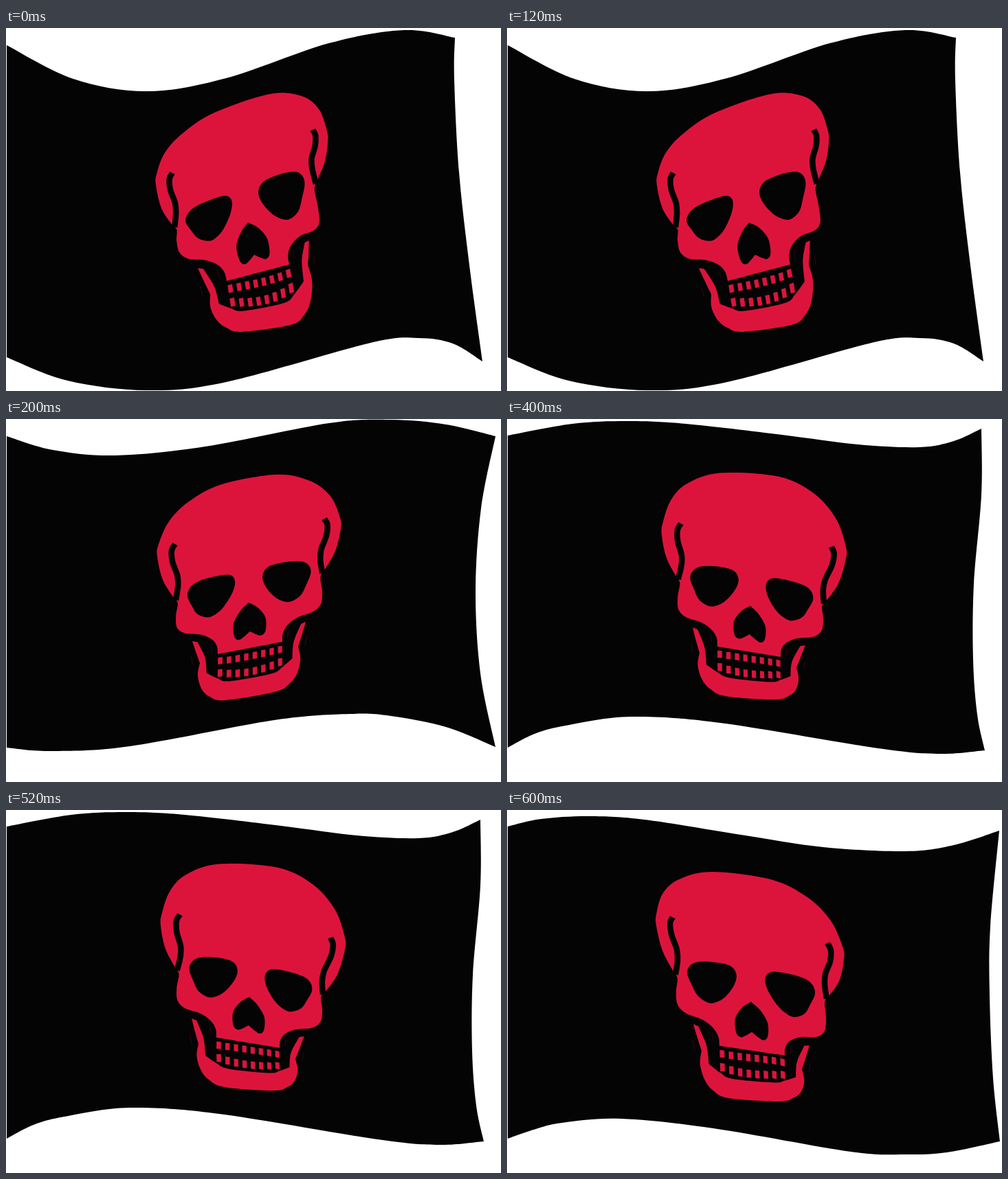
Write an HTML page that moves like this. It is 720x528 px and loops after 0.8 s.

```html
<!DOCTYPE html>
<html lang="en">
<head>
<meta charset="utf-8">
<title>Waving skull flag</title>
<style>
html, body { margin: 0; width: 100%; height: 100%; overflow: hidden; background: #fff; }
svg { display: block; width: 720px; height: 528px; }
.cloth, .hole { fill: #040404; }
.bone { fill: #dc143c; }
.groove { fill: none; stroke: #040404; stroke-width: 8.5; }
.scratch { fill: none; stroke: #3a0510; stroke-width: 1; }
</style>
</head>
<body>
<svg id="stage" viewBox="0 0 720 528"></svg>
<script>
const HOLD = 200;
const stage = document.getElementById('stage');

// Points are [x, y, corner]; "!" marks a corner, all others are passed smoothly.
const parse = s => s.trim().split(/\s+/).map(p => [...p.split(',').map(parseFloat), p.endsWith('!')]);
const flip = ([x, y, corner]) => [-x, y, corner];
const mirrored = half => [...half, ...half.map(flip).reverse()];
const fmt = p => p[0].toFixed(2) + ' ' + p[1].toFixed(2);

// The skull is symmetric about x = 0, so only one half is given.
const face = mirrored(parse(`40,88 88,105 117,130 132,162 134,180 126,214 110,241! 104,250
  106,268 104,286 92,296 70,301 55,310 48,321 47,333!`));
const jaw = mirrored(parse(`36,403 58,394 69,381 74,361 71,343! 77,325 82,309! 75,311! 66,330
  63,342 62,359! 47,369 30,376`));
const nose = mirrored(parse('0,267! 12,276 22,290 24,302 22,314 16,318 9,315 0,309!'));
const eye = parse('90,241 86,229 74,222 50,219 28,221 20,232 24,248 37,266 50,275 61,277 75,270 83,257');
const groove = parse('108,163 113,172 112,189 105,209 104,225 107,245');
const scratches = [parse('83,331 81,344'), parse('56,317 55,328')];

// Key points: crown, temple, groove top, lobe tip, cheek, mouth, jaw hinge, chin side.
const keys = parse('88,105 134,177 109,163 110,241 106,275 47,333 71,343 60,393');
const rest = [...keys.map(flip), ...keys, [0, 267]];

// Gaussian elimination with pivoting; each row ends in two right-hand values.
function solve(rows) {
  const n = rows.length;
  for (let c = 0; c < n; c++) {
    let best = c;
    for (let r = c + 1; r < n; r++) {
      if (Math.abs(rows[r][c]) > Math.abs(rows[best][c])) best = r;
    }
    [rows[c], rows[best]] = [rows[best], rows[c]];
    for (let r = 0; r < n; r++) {
      if (r === c) continue;
      const k = rows[r][c] / rows[c][c];
      for (let j = c; j < n + 2; j++) rows[r][j] -= k * rows[c][j];
    }
  }
  return rows.map((row, i) => [row[n] / row[i], row[n + 1] / row[i]]);
}

// Thin-plate spline that bends the plane so `from` lands on `to`.
function makeWarp(from, to) {
  const scale = 100;
  const src = from.map(([x, y]) => [x / scale, y / scale]);
  const basis = (x, y) => [
    ...src.map(([a, b]) => {
      const d = (x - a) ** 2 + (y - b) ** 2;
      return d ? d * Math.log(d) : 0;
    }), 1, x, y
  ];
  const rows = src.map(([x, y], i) => [...basis(x, y), to[i][0], to[i][1]]);
  for (let k = 0; k < 3; k++) {
    rows.push([...src.map(([x, y]) => [1, x, y][k]), 0, 0, 0, 0, 0]);
  }
  const weights = solve(rows);
  return ([x, y, corner]) => {
    const b = basis(x / scale, y / scale);
    const sum = k => b.reduce((s, v, i) => s + v * weights[i][k], 0);
    return [sum(0), sum(1), corner];
  };
}

// Catmull-Rom curve that breaks its tangent at corners.
function curve(pts, closed = true) {
  const n = pts.length;
  const at = i => closed ? pts[(i + n) % n] : pts[Math.max(0, Math.min(n - 1, i))];
  let d = 'M' + fmt(pts[0]);
  for (let i = 0; i < (closed ? n : n - 1); i++) {
    const b = at(i), c = at(i + 1);
    const a = b[2] ? b : at(i - 1);
    const e = c[2] ? c : at(i + 2);
    const out = [0, 1].map(k => b[k] + (c[k] - a[k]) / 6);
    const into = [0, 1].map(k => c[k] - (e[k] - b[k]) / 6);
    d += `C${fmt(out)} ${fmt(into)} ${fmt(c)}`;
  }
  return closed ? d + 'Z' : d;
}

// Eight teeth whose row rises by `lift` towards both ends.
function teeth(warp, y, lift, height) {
  let d = '';
  for (let i = 0; i < 8; i++) {
    const u = (i - 3.5) / 3.5;
    const box = [[-1, -1], [1, -1], [1, 1], [-1, 1]].map(([a, b]) =>
      fmt(warp([u * 43.5 + a * 3.2, y - lift * u * u + b * height / 2])));
    d += 'M' + box.join('L') + 'Z';
  }
  return d;
}

function add(parent, tag, attrs) {
  const el = document.createElementNS('http://www.w3.org/2000/svg', tag);
  for (const key in attrs) el.setAttribute(key, attrs[key]);
  return parent.appendChild(el);
}

function pose(cloth, marks) {
  const g = add(stage, 'g', { display: 'none' });
  const warp = makeWarp(rest, parse(marks));
  const draw = (kind, d) => add(g, 'path', { class: kind, d });
  const shape = (kind, pts, closed) => draw(kind, curve(pts.map(warp), closed));
  const pair = (kind, pts, closed) => {
    shape(kind, pts, closed);
    shape(kind, pts.map(flip), closed);
  };
  draw('cloth', curve(parse(cloth)));
  shape('bone', face);
  shape('bone', jaw);
  shape('hole', nose);
  pair('hole', eye);
  pair('groove', groove, false);
  scratches.forEach(s => pair('scratch', s, false));
  draw('bone', teeth(warp, 345, 1.5, 10));
  draw('bone', teeth(warp, 367.5, 6, 11));
  return g;
}

// Each pose: cloth outline, then where the key points go (left, right, nose top).
const poses = [
  pose(`1,25! 98,74 205,92 320,73 470,22 580,3 653,14! 652,75 659,210 674,345 693,485!
    650,459 600,451 530,458 320,515 205,527 90,513 1,479!`,
    `256,154 218,226 241,211 242,287 249,316 321,368 297,387 318,435
    430,99 468,163 447,148 453,221 455,270 412,344 439,345 436,415 352,283`),
  pose(`1,25! 68,45 160,53 290,40 470,6 560,1 640,8 712,25! 691,130 683,250 690,370 712,477!
    640,448 560,432 500,429 390,438 180,476 65,483 1,478!`,
    `266,120 220,197 245,182 244,260 247,293 308,342 282,355 294,403
    442,90 487,157 464,145 463,220 460,257 402,324 425,331 415,383 353,267`),
  pose(`1,24! 95,7 175,3 260,7 400,23 510,37 600,41 650,32 690,14! 690,110 679,240 678,350
    684,430 695,482! 630,487 540,479 310,442 180,433 85,446 40,458 1,478!`,
    `262,94 225,165 252,152 246,229 248,265 306,331 280,340 294,392
    446,108 493,201 473,186 464,265 460,297 398,346 421,362 412,402 354,272`),
  pose(`1,24! 50,13 120,9 200,14 340,36 460,54 580,60 650,51 716,30! 703,170 702,270 707,390
    717,482! 640,498 580,501 500,497 300,463 165,449 80,455 42,464 1,478!`,
    `250,101 217,166 240,156 242,235 246,271 309,343 283,350 298,407
    437,127 490,214 467,194 468,271 464,309 404,357 429,377 419,418 355,279`)
];

function update(time) {
  const now = Math.floor(time / HOLD) % poses.length;
  poses.forEach((g, i) => g.setAttribute('display', i === now ? 'inline' : 'none'));
}

function tick(time) {
  update(time);
  requestAnimationFrame(tick);
}

update(0);
requestAnimationFrame(tick);
</script>
</body>
</html>
```
